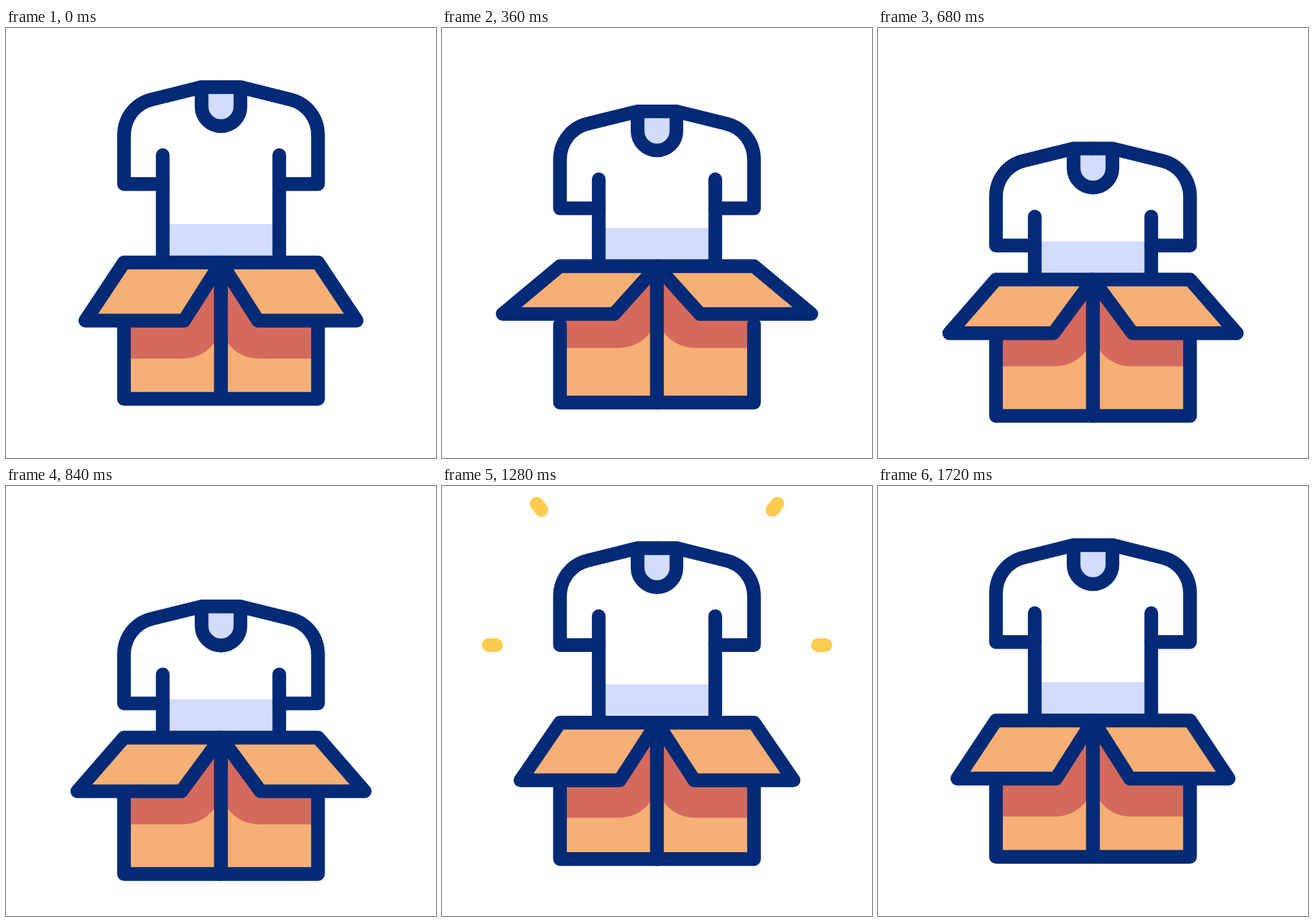
An HTML page that plays this animation: 640 by 640 pixels, repeating every 1.76 s.

```html
<!DOCTYPE html>
<html lang="en">
<head>
<meta charset="utf-8">
<title>T-shirt in a box</title>
<style>
  html, body { margin: 0; height: 100%; overflow: hidden; background: #fff; }
  svg { display: block; width: 100vw; height: 100vh; }
  path { fill: none; stroke: none; stroke-width: 20.4; stroke-linecap: round; stroke-linejoin: round; }
  .line { stroke: #032a76; }
  .lilac { fill: #d2dcfd; }
  .card { fill: #f6af74; }
  .shade { fill: #d46a5d; }
  .spark { stroke: #ffcb50; }
</style>
</head>
<body>
<svg viewBox="0 0 640 640">
  <g id="half">
    <path id="sparks" class="spark"/>
    <path id="hem" class="lilac"/>
    <g id="shirt">
      <path class="lilac" d="M291.1 88V117A28.9 28.9 0 0 0 320 146V88Z"/>
      <path class="line" d="M291.1 88V117A28.9 28.9 0 0 0 320 146M320 88H291L217 106.3C192 112.5 175.6 134 175.6 160V232.3H233.3"/>
    </g>
    <path id="side" class="line"/>
    <g id="box">
      <path class="card" d="M175.6 400L320 349V552H175.6Z"/>
      <path id="shade" class="shade"/>
      <path class="line" d="M175.6 436V552H320V349"/>
      <path id="flap" class="card line"/>
    </g>
  </g>
  <use href="#half" transform="matrix(-1 0 0 1 640 0)"/>
</svg>
<script>
const LOOP = 1760;
const el = id => document.getElementById(id);
const draw = (id, d) => el(id).setAttribute('d', d);
const shift = (id, y) => el(id).setAttribute('transform', `translate(0 ${y})`);
const mix = (a, b, k) => a + (b - a) * k;

// cubic-bezier(a, 0, b, 1) progress between two times
function ease(t, from, to, a = .67, b = .33) {
  const x = Math.min(1, Math.max(0, (t - from) / (to - from)));
  let lo = 0, hi = 1;
  for (let i = 0; i < 24; i++) {
    const s = (lo + hi) / 2, r = 1 - s;
    if (3 * r * r * s * a + 3 * r * s * s * b + s * s * s < x) lo = s; else hi = s;
  }
  return lo * lo * (3 - 2 * lo);
}

function segment([x0, y0, x1, y1], tail, tip) {
  const at = k => `${mix(x0, x1, k)} ${mix(y0, y1, k)}`;
  return tip - tail > .005 ? `M${at(tail)}L${at(tip)}` : '';
}

function render(t) {
  const boxY = 25.8 * (ease(t, 80, 760, .71, .4) - ease(t, 760, 1560, .615, .27));
  const sink = 66 * (ease(t, 120, 600, .66, .38) - ease(t, 800, 1400, .74, .07));
  const shirtY = boxY + sink;

  // flaps spring wide open, settle halfway, then return
  const open = ease(t, 80, 390), settle = ease(t, 390, 700), close = ease(t, 1010, 1400);
  const pose = (wide, rest) => wide * open + (rest - wide) * settle - rest * close;
  const lift = pose(1, .43), shadeY = 492 - pose(21.5, 14);
  const flapY = 435.5 - 15.5 * lift, shadeX = 264 - 2 * lift;

  shift('box', boxY);
  shift('shirt', shirtY);
  draw('hem', `M233.3 ${292 + boxY}H320V${352 + boxY}H233.3Z`);
  draw('side', `M233.3 ${189.2 + shirtY}V${349 + boxY}`);
  draw('flap', `M175.6 349H320L${265 - 9 * lift} ${flapY}H${118.1 - 28 * lift}Z`);
  draw('shade', `M175.6 ${flapY}L320 349V${shadeY - 39}L311 ${shadeY - 25}` +
    `C300 ${shadeY - 9} 283 ${shadeY} ${shadeX} ${shadeY}H175.6Z`);

  const tip = ease(t, 1000, 1310), tail = ease(t, 1030, 1415);
  shift('sparks', shirtY);
  draw('sparks', segment([141, 232.3, 69, 232.3], tail, tip) + segment([188, 81, 140.5, 21.5], tail, tip));
}

function frame() {
  render(performance.now() % LOOP);
  requestAnimationFrame(frame);
}
frame();
</script>
</body>
</html>
```
